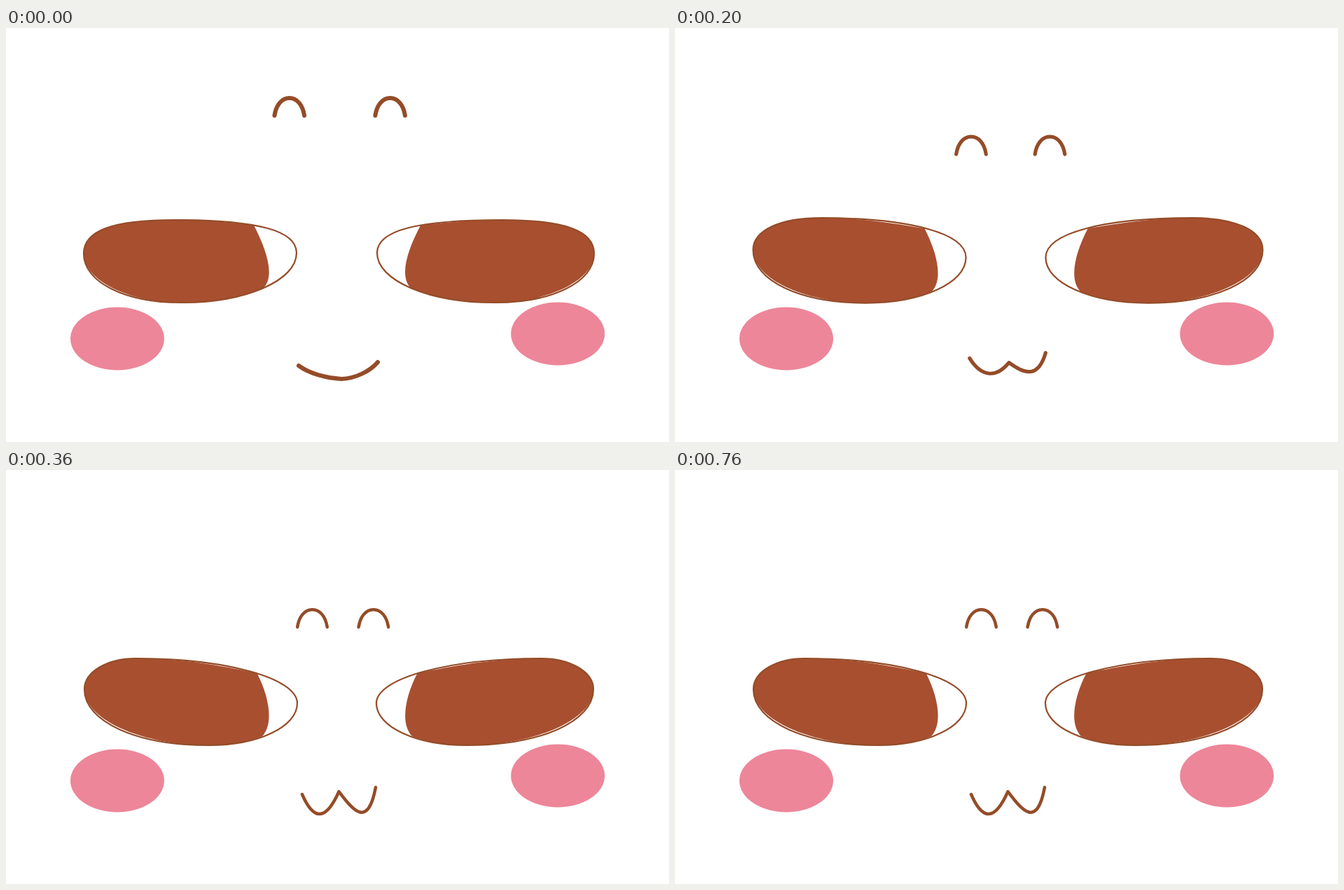
Write an HTML page that moves like this. It is 947 by 591 pixels and loops after 1.12 s.

```html
<!DOCTYPE html>
<html lang="en">
<head>
<meta charset="utf-8">
<title>Happy face</title>
<style>
  html, body { margin: 0; width: 100%; height: 100%; overflow: hidden; background: #fff; }
  svg { display: block; width: 100vw; height: 100vh; }
  .line { fill: none; stroke: #944c28; stroke-linecap: round; stroke-linejoin: round; }
</style>
</head>
<body>
<svg viewBox="0 0 947 591">
  <defs>
    <g id="eye">
      <path id="iris" fill="#a84f30"/>
      <path id="rim" class="line" stroke-width="2.2"/>
    </g>
    <path id="brow" d="M-21.3 25C-19 10 -11 0 0 0S19 10 21.3 25"/>
  </defs>
  <rect id="sky" width="947" height="591"/>
  <use href="#eye"/>
  <use href="#eye" transform="translate(953.2 0) scale(-1.0197 1)"/>
  <g fill="#ed8699">
    <ellipse cx="159" cy="443.5" rx="67" ry="45"/>
    <ellipse cx="788.2" cy="436.5" rx="67" ry="45"/>
  </g>
  <g id="strokes" class="line">
    <use id="browL" href="#brow"/>
    <use id="browR" href="#brow"/>
    <path id="mouth"/>
  </g>
  <path id="glint" fill="#fffee8"/>
</svg>
<script>
const LOOP = 1120, STEP = 40, MOVE = 360;
const $ = id => document.getElementById(id);
const set = (id, name, value) => $(id).setAttribute(name, value);
const mix = (a, b, p) => a + (b - a) * p;
const add = ([x, y], dx, dy) => [x + dx, y + dy];
// A point u of the way across and v of the way down from a to b.
const between = (a, b, u, v) => [mix(a[0], b[0], u), mix(a[1], b[1], v)];
const curve = (...points) => 'C' + points.join(' ');

// Quarter turns that leave a vertically or horizontally; k is the roundness.
const turnV = (a, b, k) => curve(between(a, b, 0, k), between(a, b, 1 - k, 1), b);
const turnH = (a, b, k) => curve(between(a, b, k, 0), between(a, b, 1, 1 - k), b);

const calm = {
  left: [111, 322], top: [240, 274], right: [415, 321], bottom: [250, 392],
  corner: [354, 281.5], heel: [368, 371], round: 0.68,
  lipL: [418, 482], notch: [479, 501], lipR: [531, 477], sagL: 12, sagR: 13, dip: -1,
  browL: [404.8, 100], browR: [548.7, 100], width: 6
};
const cheeky = {
  left: [112, 313], top: [185, 269], right: [416, 333], bottom: [290, 393],
  corner: [358.5, 290], heel: [366, 380], round: 0.56,
  lipL: [423, 463], notch: [475.5, 459], lipR: [528, 453], sagL: 37, sagR: 59, dip: 43,
  browL: [437.5, 199.2], browR: [524.9, 199.2], width: 4.5
};

function pose(p) {
  const out = {};
  for (const key in calm) {
    const a = calm[key], b = cheeky[key];
    out[key] = Array.isArray(a) ? between(a, b, p, p) : mix(a, b, p);
  }
  return out;
}

const rim = ({ left, top, right, bottom, round }) =>
  'M' + left + turnV(left, top, round) + turnH(top, right, round) +
  turnV(right, bottom, 0.56) + turnH(bottom, left, 0.58);

// Slightly flatter than the rim, so thin slivers stay open.
const iris = ({ left, top, bottom, corner, heel, round }) =>
  'M' + left + turnV(left, top, round) +
  curve(between(top, corner, 0.4, 0), between(top, corner, 0.7, 0.5), corner) +
  curve(add(corner, 17, 33), add(heel, 17, -18), heel) +
  curve(between(heel, bottom, 0.25, 0.6), between(heel, bottom, 0.6, 1), bottom) +
  turnH(bottom, left, 0.54);

const mouth = ({ lipL, notch, lipR, sagL, sagR, dip }) =>
  'M' + lipL + curve(add(lipL, 16, sagL), add(notch, -19, dip), notch) +
  curve(add(notch, 20, dip * 0.63), add(lipR, -11, sagR), lipR);

function star(long, short, waist) {
  const points = [];
  for (let i = 0; i < 8; i++) {
    const r = i % 2 ? waist : i % 4 ? short : long;
    const a = i * Math.PI / 4;
    points.push([r * Math.cos(a), r * Math.sin(a)]);
  }
  return 'M' + points.join('L') + 'Z';
}

function drawGlint(t) {
  const on = t >= 480 && t < 760;
  const beat = Math.floor((t - 480) / 80);
  const size = 1 - Math.abs(beat - 2) / 4;
  set('sky', 'fill', on ? '#fffff7' : '#fff');
  set('glint', 'visibility', on ? 'visible' : 'hidden');
  set('glint', 'transform', `translate(817 277) rotate(${(3 - beat) * 37.7}) scale(${size})`);
}

function draw(time) {
  const t = Math.floor((time % LOOP) / STEP) * STEP;
  const face = pose(Math.min(1, t / MOVE));
  set('rim', 'd', rim(face));
  set('iris', 'd', iris(face));
  set('mouth', 'd', mouth(face));
  for (const id of ['browL', 'browR']) set(id, 'transform', `translate(${face[id]})`);
  set('strokes', 'stroke-width', face.width);
  drawGlint(t);
}

set('glint', 'd', star(117, 78, 6));
const start = performance.now();
function tick() {
  draw(performance.now() - start);
  requestAnimationFrame(tick);
}
tick();
</script>
</body>
</html>
```
